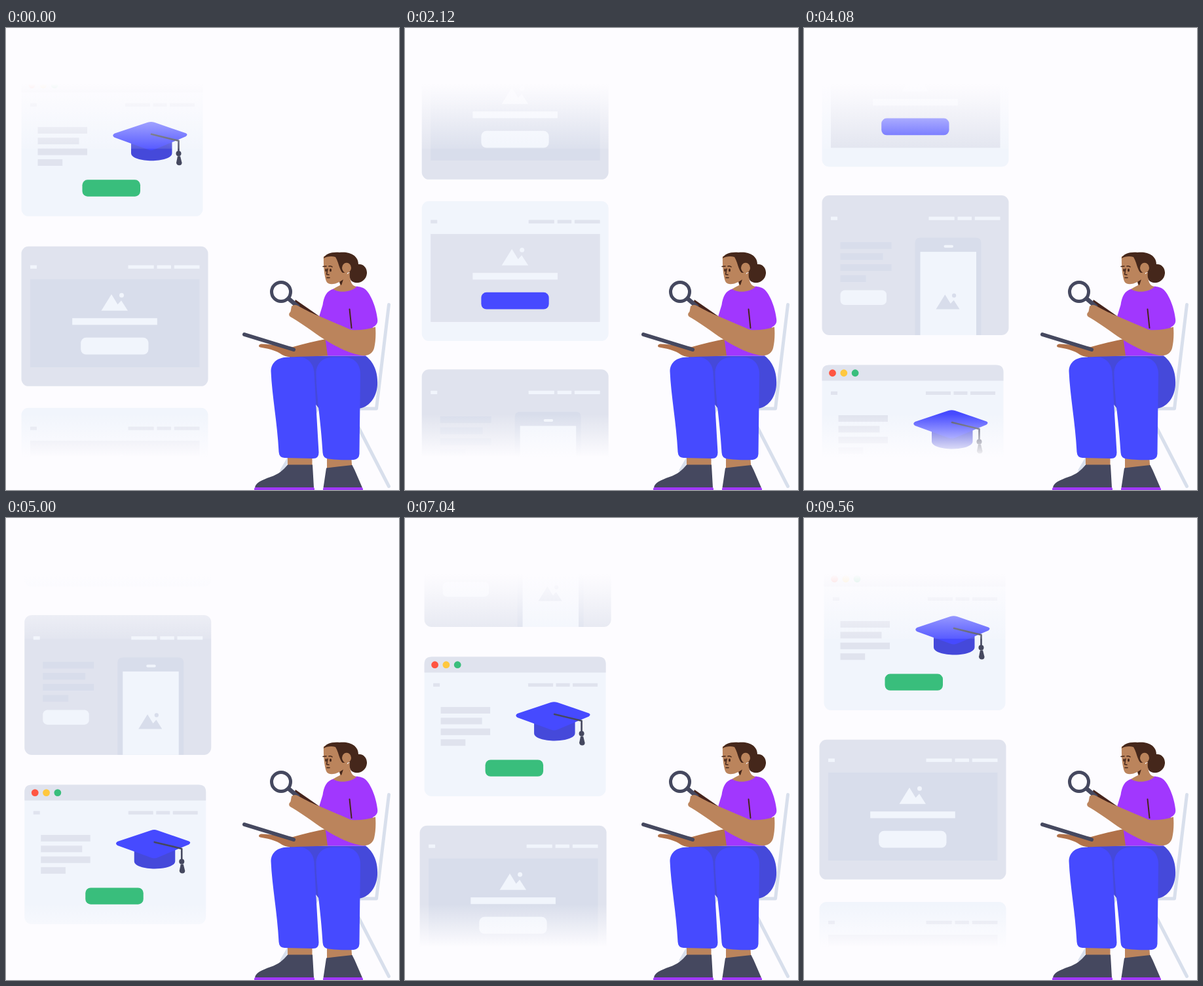
Write an HTML page that moves like this. It is 600x704 px and loops after 9600 ms.

```html
<!DOCTYPE html>
<html lang="en">
<head>
<meta charset="utf-8">
<title>Browsing pages</title>
<style>
html, body { margin: 0; width: 100%; height: 100%; overflow: hidden; background: #fdfcff; }
svg { display: block; width: 600px; height: 704px; }
</style>
</head>
<body>
<svg viewBox="0 0 600 704" xmlns="http://www.w3.org/2000/svg">
  <defs>
    <linearGradient id="fadeTop" x1="0" y1="0" x2="0" y2="1">
      <stop offset="0" stop-color="#fdfcff"/>
      <stop offset=".28" stop-color="#fdfcff" stop-opacity=".78"/>
      <stop offset="1" stop-color="#fdfcff" stop-opacity=".1"/>
    </linearGradient>
    <linearGradient id="fadeBottom" x1="0" y1="0" x2="0" y2="1">
      <stop offset="0" stop-color="#fdfcff" stop-opacity="0"/>
      <stop offset="1" stop-color="#fdfcff"/>
    </linearGradient>
  </defs>

  <g id="strip"></g>

  <g>
    <rect x="10" y="0" width="320" height="86" fill="#fdfcff"/>
    <rect x="10" y="85" width="320" height="99" fill="url(#fadeTop)"/>
    <rect x="10" y="588" width="320" height="66" fill="url(#fadeBottom)"/>
    <rect x="10" y="653" width="320" height="51" fill="#fdfcff"/>
  </g>

  <!-- chair -->
  <path d="M584.5 421.500L565.500 580H470M527 587L584.500 698.500M478 576L421 674" fill="none" stroke="#d8dfec" stroke-width="5" stroke-linecap="round" stroke-linejoin="round"/>

  <!-- legs -->
  <path d="M430 652H467.500V668H430ZM490 652H527L528.500 671H490Z" fill="#bb845c"/>
  <path d="M430 665.500H468L470 700.500H380C381 693 390 689 404 684C416 680 423 674 430 665.500ZM489 670.500L528.500 666L532.500 674L544 700.500H484.500Z" fill="#45485f"/>
  <path d="M379 704V702Q379 700 382 700H469Q471 700 471 702V704ZM484 704V702Q484 700 487 700H542Q545 700 545 703V704Z" fill="#a038fb"/>
  <path d="M432 499.500H549C563 510 568 527 567 544C566 563 554 579 537 580H478L466 565Z" fill="#4549da"/>
  <path d="M404.500 523C404.500 509 416 501.500 431 501.500H447C461 501.500 470 512 470.500 526L477.500 647Q477.500 656 469 656L425 655Q417 654.500 416.500 646C414 600 406 560 404.500 523Z" fill="#464aff"/>
  <path d="M473.500 526C473.500 510 485 501.500 500 501.500H515C531 501.500 541 511 541 528L539.500 649Q539 657 531 658Q510 659 492 656.500Q484 655.500 483.500 647C481 600 474 565 473.500 526Z" fill="#464aff"/>

  <!-- far arm and tablet -->
  <path d="M491 473.500C472 477 455 481 438 486C425 485 405 482 390 481.500C386 482 384.500 485 388 486.500C398 488 410 491 417 495C425 501 432 502 443 501L491 499.500Z" fill="#b1724a"/>
  <path d="M364 467L439 490" stroke="#45485f" stroke-width="6" stroke-linecap="round"/>

  <!-- torso -->
  <path d="M442 414L478 439L470 444L438 424Z" fill="#45231c"/>
  <path d="M500 397.500C489 401 485.500 409 483.500 422L477 443L487 470L491 499.500H549L560 456C566 453 568 449 567 443C565 425 556 402 546 396.500C540 393 528 393 520 394Z" fill="#a137fe"/>
  <path d="M509 384L510 392C506 394 502 396 499.500 398C508 404 526 403 535 394.500C528 392 525 388 525 372Z" fill="#bb845c"/>
  <path d="M509 386L515 383L512 392Q510 391 509 386Z" fill="#45271b"/>

  <!-- magnifier and near arm -->
  <path d="M431 412L445 424" stroke="#45485f" stroke-width="6.500" stroke-linecap="round"/>
  <circle cx="420" cy="402" r="14.500" fill="#fdfcff" stroke="#45485f" stroke-width="5"/>
  <path d="M436 424Q441 420 447 424C460 431 468 435 478 439L527 460C540 461 553 459 564 455.500C565 468 564 480 562 488C559 498 550 500.500 540 498.500C520 494 500 484 479 470C462 458 445 446 434 440Q430 437 434.500 432Z" fill="#bb845c"/>
  <path d="M524.500 428.500L527.500 457" stroke="#45271b" stroke-width="2" stroke-linecap="round"/>

  <!-- head -->
  <path d="M485 348C484.500 364 486 378 489 386C492 392 501 391 509 387L520 380L524 355L504 344Z" fill="#bb845c"/>
  <path d="M484.500 351C488 344 497 341 509 342C525 340 538 347 538 360C546 359 551.500 366 551 374C550 385 539 391 530 387C525 385 524 379 525 372L514 373C509 369 508 357 503 349C497 347 490 348 484.500 351Z" fill="#45271b"/>
  <ellipse cx="520" cy="365.500" rx="7" ry="7.700" fill="#bb845c"/>
  <path d="M484 363.500L489 363M493 363Q496 362 498 364M491 367L489.500 375.500L493 376M490 380.500L494 380.500" fill="none" stroke="#45271b" stroke-width="1.500" stroke-linecap="round" stroke-linejoin="round"/>
  <ellipse cx="488.500" cy="369" rx="1.300" ry="2.300" fill="#45271b"/>
  <ellipse cx="495.500" cy="369" rx="1.500" ry="2.500" fill="#45271b"/>
</svg>
<script>
const PALE = '#f1f5fc', GREY = '#e0e3ee', MID = '#d8ddeb';
const BLUE = '#464aff', GREEN = '#39be7c', DARK = '#45485f';

const box = (x, y, w, h, fill, r = 0) =>
  `<rect x="${x}" y="${y}" width="${w}" height="${h}" rx="${r}" fill="${fill}"/>`;
const dot = (x, y, r, fill) => `<circle cx="${x}" cy="${y}" r="${r}" fill="${fill}"/>`;
const path = (d, fill, extra = '') => `<path d="${d}" fill="${fill}" ${extra}/>`;

// Logo and three links; each link is [x, width].
const nav = (y, fill, links) =>
  [[13.5, 10], ...links].map(([x, w]) => box(x, y, w, 5.2, fill, .5)).join('');
const wideNav = [[163, 39.2], [207, 21.5], [233.2, 38.8]];

const lines = (x, y, step, h, fill, widths) =>
  widths.map((w, i) => box(x, y + i * step, w, h, fill)).join('');

const picture = (x, y, k, fill) =>
  `<g transform="translate(${x} ${y}) scale(${k})">` +
  path('M0 0L15.500 -25L25 -9.500L30.500 -15.500L40.500 0Z', fill) +
  dot(31, -23.5, 3.5, fill) + '</g>';

function heroPage(card, bars, hero, button) {
  return box(0, 0, 285, 213, card, 11) + nav(28.7, bars, wideNav) +
    box(13.5, 50, 258.5, 134, hero) + picture(122, 98, 1, PALE) +
    box(77.7, 109.3, 129.6, 10.2, PALE) + box(90.7, 139, 103.3, 25.7, button, 8);
}

function phonePage() {
  return box(0, 0, 285, 213, GREY, 11) + nav(32.4, PALE, wideNav) +
    lines(28, 71.3, 16.8, 10.3, MID, [78, 65, 78, 39]) +
    box(28, 144.5, 70.5, 22.5, PALE, 7) +
    path('M142 213V72.500Q142 64.500 150 64.500H235Q243 64.500 243 72.500V213Z', MID) +
    box(150, 86, 85.5, 127, PALE) + box(186, 75.7, 14.5, 4, PALE, 2) +
    picture(174, 173.5, .89, MID);
}

function capPage() {
  return box(0, 0, 277, 212.5, PALE, 11) +
    path('M0 24V11Q0 0 11 0H266Q277 0 277 11V24Z', GREY) +
    ['#ff5542', '#ffc83f', GREEN].map((c, i) => dot(16 + 17.3 * i, 12.2, 5.4, c)).join('') +
    nav(40.2, GREY, [[158.5, 38], [201, 21], [226.5, 38]]) +
    lines(25, 76.5, 16.4, 10, GREY, [75.5, 63, 75.5, 37.7]) +
    path('M167.500 88H230V116.500C230 124 214 128 198.800 128S167.500 124 167.500 116.500Z', '#4549da') +
    path('M142 86.500L193 69.500Q198 67.800 203 69.500L251 86Q255 88 251 91L203 111Q198 113 193 111L142 92.500Q137.500 89.500 142 86.500Z', BLUE) +
    path('M198.500 87.500L240 97.500V117', 'none', `stroke="${DARK}" stroke-width="2.6" stroke-linecap="round" stroke-linejoin="round"`) +
    dot(240, 117, 4, DARK) +
    path('M238.500 121H242.500L245 131Q245 135 241 135T236.500 131Z', DARK) +
    box(93, 157, 88.5, 25.3, GREEN, 8);
}

const greyHero = heroPage(GREY, PALE, MID, PALE);
const blueHero = heroPage(PALE, GREY, GREY, BLUE);
const pages = [
  [0, -258.5, capPage()], [0, 0, greyHero], [0, 246, blueHero], [0, 502.5, phonePage()],
  [0, 761, capPage()], [-7, 1018.3, greyHero], [-7, 1265.5, blueHero]
];
const strip = document.getElementById('strip');
strip.innerHTML = pages.map(([x, y, art]) =>
  `<g transform="translate(${x} ${y})">${art}</g>`).join('');

// Scroll distance over time: [ms, px, px per ms], joined by cubic curves.
const LOOP = 9600, END = 1014;
const keys = [
  [0, 0, .149], [1160, 172.5, .148], [3120, 457, .135], [5000, 687.5, .111],
  [6200, 808.5, .0925], [7920, 946.5, .062], [LOOP, END, .014]
];

function scrollAt(t) {
  const i = keys.findIndex(k => k[0] > t);
  const [t0, y0, v0] = keys[i - 1], [t1, y1, v1] = keys[i];
  const d = t1 - t0, u = (t - t0) / d, w = 1 - u;
  return w * w * (1 + 2 * u) * y0 + u * u * (3 - 2 * u) * y1 + u * w * d * (w * v0 - u * v1);
}

function draw(now) {
  const s = scrollAt(now % LOOP);
  strip.setAttribute('transform', `translate(${23.5 + 7 * s / END} ${333 - s})`);
}

function tick() {
  draw(performance.now());
  requestAnimationFrame(tick);
}
tick();
</script>
</body>
</html>
```
